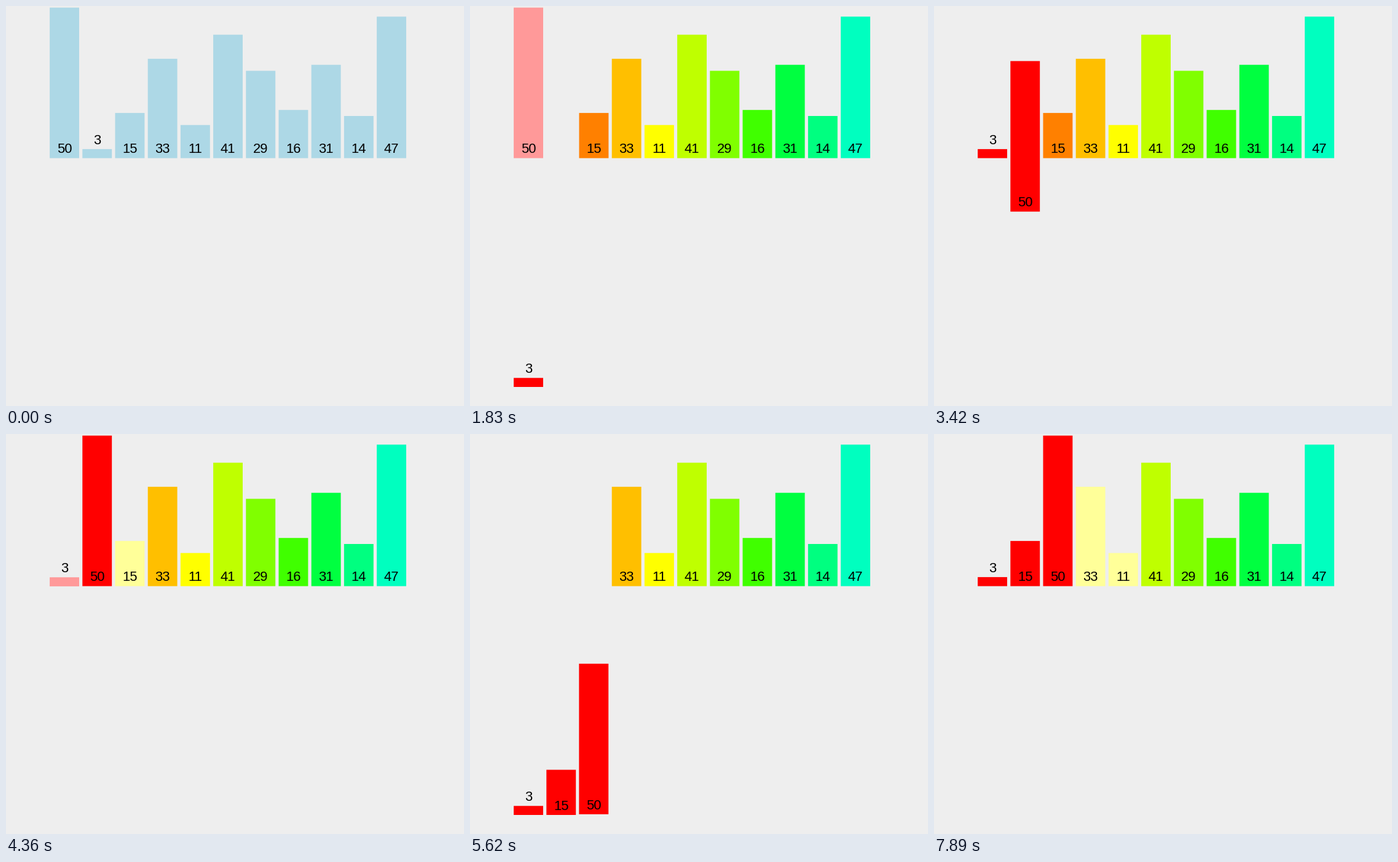
Recreate the animation shown at these times as a matplotlib script. Size 745 px wide and 651 px high, loop 8 s.

```python
import colorsys

import matplotlib.pyplot as plt
import numpy as np
from matplotlib.animation import FuncAnimation
from matplotlib.colors import to_rgb
from matplotlib.patches import Rectangle

W, H, DPI = 745, 651, 64
INTERVAL, LOOP = 20, 8000
MOVE_MS = 250

LEFT, PITCH, BAR_W, UNIT = 71.1, 53.2, 47.9, 4.9
UPPER, DROP = 247.6, 372.4
TEXT_PX, TEXT_GAP = 22, 8.2

VALUES = [50, 3, 15, 33, 11, 41, 29, 16, 31, 14, 47]
RED = to_rgb("#ff0000")
PALE_RED, PALE_ORANGE, PALE_YELLOW = map(to_rgb, ("#ff9999", "#ffcc99", "#ffff99"))


def rainbow(i):
    hue = 15 * i + (15 if i > 7 else 0)
    return colorsys.hsv_to_rgb(hue / 360, 1, 1)


def key(slot, row, color):
    return np.array([slot, row, *color], dtype=float)


# Each bar has a track of (start time, pose); a pose is slot, row, r, g, b.
tracks = {}
for i, value in enumerate(VALUES):
    tracks[value] = [(-LOOP, key(i, 0, to_rgb("lightblue"))),
                     (490, key(i, 0, rainbow(i)))]


def tint(start, value, color):
    slot, row = tracks[value][-1][1][:2]
    tracks[value].append((start, key(slot, row, color)))


def take(start, value, slot):
    tracks[value].append((start, key(slot, 1, RED)))


def put_back(start, value):
    slot = tracks[value][-1][1][0]
    tracks[value].append((start, key(slot, 0, RED)))


# Merge [50] with [3]
tint(1015, 50, PALE_RED)
tint(1015, 3, PALE_ORANGE)
take(1565, 3, 0)
take(2093, 50, 1)
put_back(2755, 3)
put_back(3267, 50)

# Merge [3, 50] with [15]
tint(3802, 3, PALE_RED)
tint(3802, 15, PALE_YELLOW)
take(4345, 3, 0)
tint(4345, 50, PALE_RED)
take(4865, 15, 1)
take(5393, 50, 2)
put_back(5963, 3)
put_back(6490, 15)
put_back(7105, 50)

# Start to merge [33] with [11]
tint(7630, 33, PALE_YELLOW)
tint(7630, 11, PALE_YELLOW)


def ease(p):
    p = min(max(p, 0), 1)
    return 4 * p ** 3 if p < 0.5 else 1 - 4 * (1 - p) ** 3


def pose_at(track, t):
    pose = track[0][1]
    for start, goal in track[1:]:
        pose = pose + (goal - pose) * ease((t - start) / MOVE_MS)
    return pose


fig = plt.figure(figsize=(W / DPI, H / DPI), dpi=DPI, facecolor="#eeeeee")
ax = fig.add_axes([0, 0, 1, 1])
ax.set_xlim(0, W)
ax.set_ylim(H, 0)
ax.axis("off")

bars = []
for n, value in enumerate(VALUES):
    rect = Rectangle((0, 0), BAR_W, value * UNIT, lw=0, snap=False, zorder=2 + n)
    ax.add_patch(rect)
    label = ax.text(0, 0, str(value), ha="center", va="baseline", color="black",
                    family="Liberation Sans", size=TEXT_PX * 72 / DPI,
                    zorder=2.5 + n)
    bars.append((value, rect, label))


def draw(frame):
    t = frame * INTERVAL
    for value, rect, label in bars:
        slot, row, *color = pose_at(tracks[value], t)
        x = LEFT + slot * PITCH
        bottom = UPPER + row * DROP
        top = bottom - value * UNIT
        rect.set_xy((x, top))
        rect.set_facecolor(np.clip(color, 0, 1))
        # The number of a very short bar stands above it.
        base = top if value < 5 else bottom
        label.set_position((x + BAR_W / 2, base - TEXT_GAP))
    return [artist for _, *pair in bars for artist in pair]


anim = FuncAnimation(fig, draw, frames=LOOP // INTERVAL, interval=INTERVAL,
                     repeat=True, repeat_delay=0)
plt.show()
```
